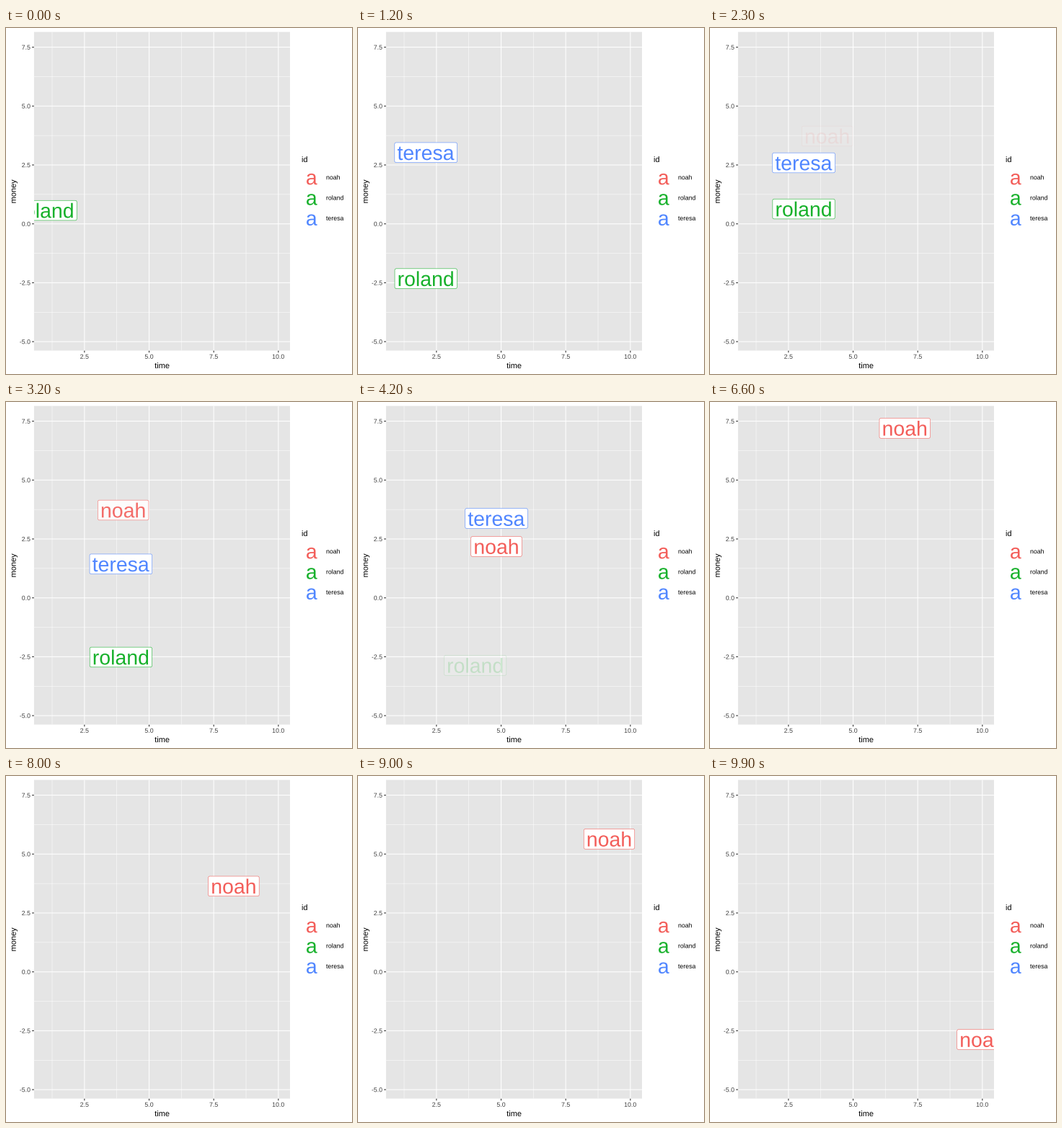
Animation of 480 by 480 pixels, one loop 10000 ms. Source, as a matplotlib script:

```python
import matplotlib.pyplot as plt
import numpy as np
from matplotlib.animation import FuncAnimation
from matplotlib.patches import FancyBboxPatch, PathPatch, Rectangle
from matplotlib.textpath import TextPath
from matplotlib.transforms import Affine2D

plt.rcParams["font.family"] = "Liberation Sans"

SIZE = 480
FRAMES = 100
STEP = 11                                   # frames per unit of time
LEFT, TOP, RIGHT, BOTTOM = 38.9, 5.5, 394.0, 447.5
BIG, TITLE, SMALL = 28.45, 11, 8.8
PAD, CAP = 3.6, 0.72

# name: colour, first time, money at each following time
TRACKS = {
    "noah": ("#F35E5A", 4, [3.724, 1.836, -4.764, 7.2, 2.176, 7.531, -2.873]),
    "roland": ("#17B12B", 1, [0.57, -2.656, 0.982, -2.867]),
    "teresa": ("#5086FF", 2, [3.057, 2.72, 1.307, 3.831, -1.117]),
}


def px(time):
    return LEFT + (time - 0.55) * (RIGHT - LEFT) / 9.9


def py(money):
    return 271.7 - 32.68 * money


fig = plt.figure(figsize=(SIZE / 72, SIZE / 72), dpi=72, facecolor="white")
ax = fig.add_axes([0, 0, 1, 1])
ax.set_xlim(0, SIZE)
ax.set_ylim(SIZE, 0)
ax.axis("off")


def place(x, y, angle=0):
    """Move a y-up shape at the origin to pixel (x, y)."""
    return Affine2D().rotate_deg(angle).scale(1, -1).translate(x, y) + ax.transData


def glyphs(s, size):
    """Text outline centred on x = 0, and its width."""
    path = TextPath((0, 0), s, size=size)
    box = path.get_extents()
    width = box.x0 + box.x1
    return path.transformed(Affine2D().translate(-width / 2, 0)), width


def write(x, y, s, size, color="black", align=0, angle=0):
    """Text on baseline y; align is -1 left, 0 centre, 1 right."""
    path, width = glyphs(s, size)
    ax.add_patch(PathPatch(path, fc=color, lw=0, zorder=4,
                           transform=place(x - align * width / 2, y, angle)))


def line(xs, ys, width, color="white", z=1):
    ax.plot(xs, ys, color=color, lw=width, zorder=z, snap=False,
            solid_capstyle="butt")


panel = ax.add_patch(Rectangle((LEFT, TOP), RIGHT - LEFT, BOTTOM - TOP,
                               fc="#E5E5E5", lw=0, zorder=0, snap=False))

for t in (1.25, 3.75, 6.25, 8.75):
    line([px(t)] * 2, [TOP, BOTTOM], 0.53)
for m in np.arange(-3.75, 7, 2.5):
    line([LEFT, RIGHT], [py(m)] * 2, 0.53)

for t in (2.5, 5.0, 7.5, 10.0):
    line([px(t)] * 2, [TOP, BOTTOM], 1.07, z=2)
    line([px(t)] * 2, [BOTTOM, BOTTOM + 2.74], 1.07, "#282828")
    write(px(t), 458.8, f"{t:.1f}", SMALL, "#404040")
for m in np.arange(-5, 8, 2.5):
    line([LEFT, RIGHT], [py(m)] * 2, 1.07, z=2)
    line([LEFT - 2.74, LEFT], [py(m)] * 2, 1.07, "#282828")
    write(34, py(m) + 3.15, f"{m:.1f}", SMALL, "#404040", align=1)

write((LEFT + RIGHT) / 2, 472, "time", TITLE)
write(13.7, (TOP + BOTTOM) / 2, "money", TITLE, angle=90)

write(410, 186, "id", TITLE, align=-1)
for i, (name, (color, *_)) in enumerate(TRACKS.items()):
    y = 207.2 + 28.3 * i
    write(424.4, y + 10, "a", BIG, color)
    write(444, y + 3, name, SMALL, align=-1)


class Label:
    def __init__(self, name, color, start, money, z):
        self.times = np.arange(start, start + len(money))
        self.money = money
        path, width = glyphs(name, BIG)
        w, h = width + 2 * PAD, BIG * CAP + 2 * PAD
        self.box = FancyBboxPatch(
            (-w / 2, -h / 2), w, h, boxstyle="round,pad=0,rounding_size=2.16",
            fc="white", ec=color, lw=0.55, zorder=z)
        shift = Affine2D().translate(0, -BIG * CAP / 2)
        self.text = PathPatch(path.transformed(shift), fc=color, lw=0,
                              zorder=z + 0.5)
        for part in (self.box, self.text):
            ax.add_patch(part)
            part.set_clip_path(panel)

    def update(self, now):
        first, last = self.times[0], self.times[-1]
        t = min(max(now, first), last)
        alpha = max(0, 1 - abs(now - t))    # fade in and out while parked
        y = py(np.interp(t, self.times, self.money))
        for part in (self.box, self.text):
            part.set_transform(place(px(t), y))
            part.set_alpha(alpha)
            part.set_visible(alpha > 1e-6)


labels = [Label(name, *track, z=5 + i)
          for i, (name, track) in enumerate(TRACKS.items())]


def draw(frame):
    for label in labels:
        label.update(1 + frame / STEP)
    return [part for label in labels for part in (label.box, label.text)]


anim = FuncAnimation(fig, draw, frames=FRAMES, interval=100, repeat=True,
                     repeat_delay=0, blit=False)
plt.show()
```
